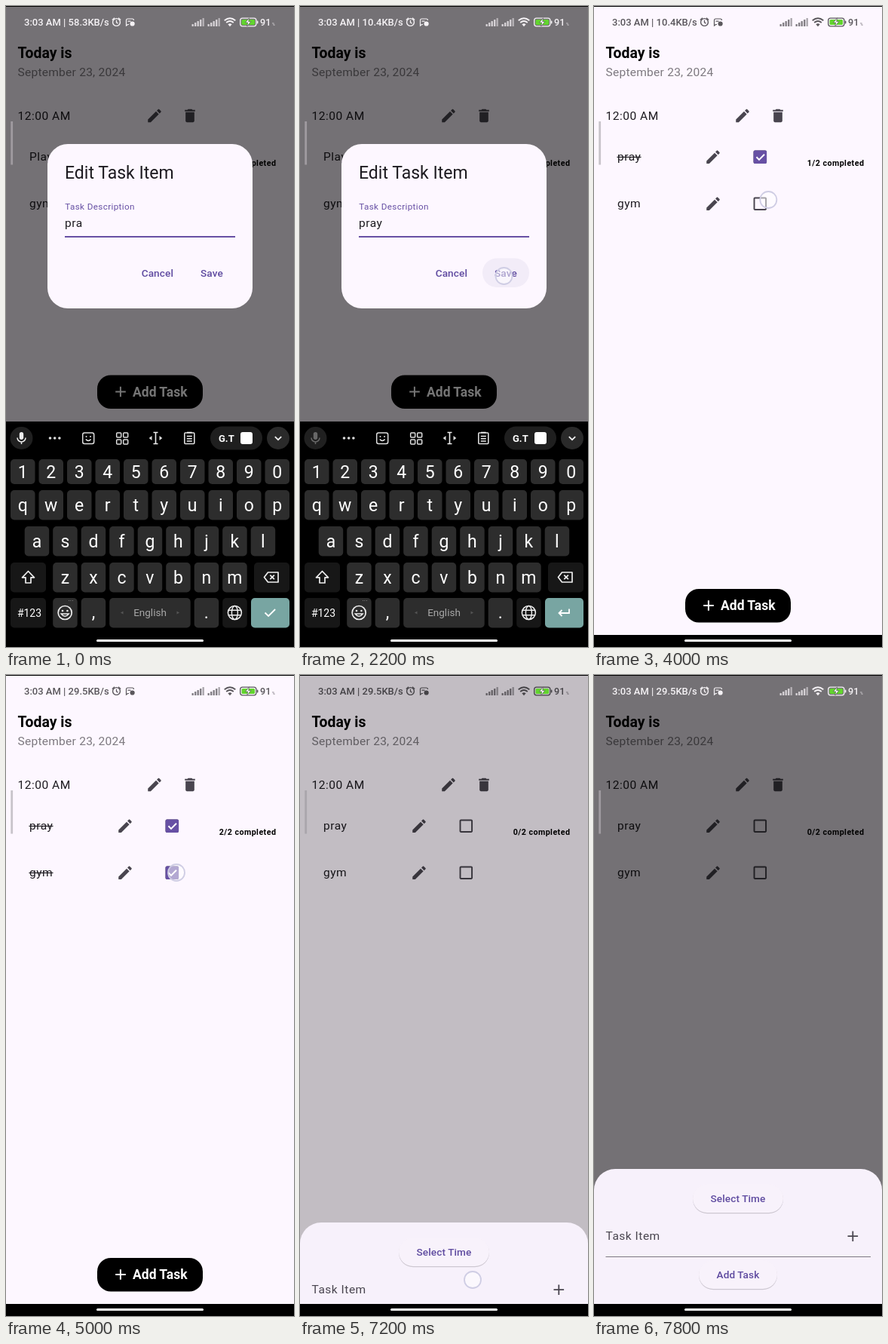
An HTML page for the animation above (8000 ms loop, 382x850 px).

```html
<!DOCTYPE html>
<html lang="en">
<head>
<meta charset="utf-8">
<title>Task planner</title>
<style>
html, body { margin: 0; width: 100%; height: 100%; overflow: hidden; background: #000; }
svg { display: block; width: 382px; height: 850px; font-family: Roboto, "Noto Sans", sans-serif; }
.body { font-size: 15.55px; letter-spacing: .49px; }
.btn { font-size: 13.6px; font-weight: 500; letter-spacing: .1px; fill: #5f4ba0; }
.mid { text-anchor: middle; }
.line { fill: none; stroke: currentColor; }
</style>
</head>
<body>
<svg id="stage" viewBox="0 0 382 850"></svg>
<script>
const PENCIL = 'M3 17.25V21h3.75L17.81 9.94l-3.75-3.75L3 17.25zM20.71 7.04c.39-.39.39-1.02 0-1.41l-2.34-2.34c-.39-.39-1.02-.39-1.41 0l-1.83 1.83 3.75 3.75 1.83-1.83z';
const TRASH = 'M6 19c0 1.1.9 2 2 2h8c1.1 0 2-.9 2-2V7H6v12zM19 4h-3.5l-1-1h-5l-1 1H5v2h14V4z';
const BOX = 'M19 5v14H5V5h14m0-2H5c-1.1 0-2 .9-2 2v14c0 1.1.9 2 2 2h14c1.1 0 2-.9 2-2V5c0-1.1-.9-2-2-2z';

const text = (x, y, s, attrs = '') => `<text x="${x}" y="${y}" ${attrs}>${s}</text>`;
const rect = (x, y, w, h, fill, r = 0, attrs = '') =>
  `<rect x="${x}" y="${y}" width="${w}" height="${h}" rx="${r}" fill="${fill}" ${attrs}/>`;
const line = (d, w = 1.5, attrs = '') => `<path class="line" d="${d}" stroke-width="${w}" ${attrs}/>`;
const icon = (d, cx, cy) =>
  `<path d="${d}" fill="#49454f" transform="translate(${cx} ${cy}) scale(.972) translate(-12 -12)"/>`;

const checkbox = (id, y) => icon(BOX, 220.3, y) +
  `<g id="${id}">${rect(211.6, y - 8.7, 17.5, 17.5, '#6750a4', 2)}
  ${line(`M215.5 ${y}l3.5 3.6 7-7.2`, 2, 'color="#fff"')}</g>`;

const bars = x => [3, 5, 7, 9, 11].map((h, i) =>
  rect(x + i * 3.5, 27 - h, 2.4, h, 'currentColor', .5, `opacity="${i < 4 ? .75 : .5}"`)).join('');

function statusBar() {
  return `<g id="status" fill="currentColor">
    <text id="clock" x="24" y="26" font-size="13" font-weight="500"></text>
    <circle class="line" cx="146.5" cy="21.5" r="4.9" stroke-width="1.4"/>
    ${line('M146.5 18.8v3l2 1.3M140.8 18.5l3.2-2.8M152.2 18.5l-3.2-2.8', 1.3)}
    ${line('M163 24.5h-1.5l-2 1.5v-7q0-2 2-2h6q2 0 2 2', 1.2)}
    <circle cx="167.6" cy="23.5" r="3.1"/>
    ${line('M161.5 20.2h4', 1.2)}
    ${bars(246.5)}${bars(267.5)}
    ${line('M289.7 19.2q7.3-6 14.6 0M292.2 22q4.8-4 9.6 0', 1.8)}
    <path d="M294.4 24.3q2.6-2 5.2 0l-2.6 3z"/>
    ${rect(310.7, 16.2, 21.2, 10.6, 'none', 3, 'stroke="currentColor" stroke-width="1.3"')}
    ${rect(312.5, 18, 17.6, 7, '#62d52e', 1.5)}
    ${rect(332.8, 19.6, 1.6, 4, 'currentColor', .8)}
    <path d="M322.5 15.8l-5 6.2h3.2l-1 5 5.2-6.4h-3.2z" fill="#fff" stroke="#555" stroke-width=".7"/>
    ${text(337, 26, '91', 'font-size="12.6" font-weight="500"')}
    ${text(353, 26, '%', 'font-size="5"')}
  </g>`;
}

function taskList() {
  return `${rect(0, 1, 382, 849, '#fdf7ff')}
    ${text(15.5, 69, 'Today is', 'font-size="19.4" font-weight="700"')}
    ${text(15.5, 93, 'September 23, 2024', 'font-size="15.55" letter-spacing=".24" fill="#7d797f"')}
    ${text(15.5, 150.5, '12:00 AM', 'class="body" fill="#1d1b20"')}
    ${icon(PENCIL, 197, 145.5)}${icon(TRASH, 244, 145.5)}
    ${text(31, 205.3, '', 'id="first" class="body" fill="#1d1b20"')}
    ${rect(30.5, 199.8, 32, 1.2, '#1d1b20', 0, 'id="strike1"')}
    ${text(31, 267.3, 'gym', 'class="body" fill="#1d1b20"')}
    ${rect(30.5, 261.8, 32, 1.2, '#1d1b20', 0, 'id="strike2"')}
    ${icon(PENCIL, 158, 200.3)}${icon(PENCIL, 158, 262.3)}
    ${checkbox('check1', 200.3)}${checkbox('check2', 262.3)}
    ${text(282.7, 212, '', 'id="count" font-size="10.7" font-weight="700" letter-spacing=".45"')}
    <g id="add">${rect(121, 773, 140, 44.5, '#000', 18)}
      ${line('M145.2 795h13.6M151.9 788.2v13.6', 2, 'color="#fff"')}
      ${text(168, 801.3, 'Add Task', 'font-size="17.5" font-weight="700" fill="#fff"')}</g>`;
}

function dialog() {
  return `<g id="dialog">${rect(55, 183, 272, 218, '#fdf7ff', 27)}
    ${text(78, 229, 'Edit Task Item', 'font-size="23" fill="#1d1b20"')}
    ${text(78.3, 270, 'Task Description', 'font-size="11.66" letter-spacing=".38" fill="#6750a4"')}
    ${text(78, 292.8, '', 'id="field" class="body" fill="#1d1b20"')}
    ${rect(78, 305, 226, 2, '#6750a4')}
    ${rect(242, 334.5, 62, 38.5, '#f2ecf8', 19.2, 'id="ripple"')}
    ${text(179.7, 359, 'Cancel', 'class="btn"')}
    ${text(258, 359, 'Save', 'class="btn"')}</g>`;
}

function pill(x, y, w, label) {
  return rect(x, y + .8, w, 38.5, '#cdc7d1', 19.2) + rect(x, y, w, 38, '#f8f2fb', 19) +
    text(x + w / 2, y + 24, label, 'class="btn mid"');
}

function sheet() {
  return `<g id="sheet"><path d="M0 860V683a28 28 0 0 1 28-28h326a28 28 0 0 1 28 28V860z" fill="#f7f1fb"/>
    ${pill(131, 675, 120, 'Select Time')}
    ${text(15.5, 749.3, 'Task Item', 'class="body" fill="#49454f"')}
    ${line('M336.5 744.2h13.6M343.3 737.4v13.6', 1.8, 'color="#49454f"')}
    ${rect(15.5, 771, 351.5, 1, '#7d7880')}
    ${pill(139, 776, 104, 'Add Task')}</g>`;
}

function keyRow(chars, x, y, h, baseline) {
  return [...chars].map((c, i) => {
    const left = x + i * 37.5;
    return rect(left, y, 32.5, h, '#2d2d2d', 5) +
      text(left + 16.2, baseline, c, 'class="mid" font-size="23" fill="#fff"');
  }).join('');
}

function keyboard() {
  const dark = '#171717', grey = '#2d2d2d';
  const dots = [58.5, 64.7, 70.9].map(x => `<circle cx="${x}" cy="573" r="1.8" fill="#ddd"/>`).join('');
  const grid = [146.7, 155.7].map(x => [566, 575].map(y =>
    rect(x, y, 6, 6, 'none', 1, 'stroke="#ddd" stroke-width="1.5"')).join('')).join('');
  return `<g id="keyboard" color="#eee">${rect(0, 551, 382, 320, '#000')}
    <circle cx="20.5" cy="573" r="15" fill="#202020"/>
    <g id="mic">${rect(17.8, 565, 5.4, 10, 'currentColor', 2.7)}
      ${line('M15 572.5a5.5 5.5 0 0 0 11 0M20.5 578v3', 1.5)}</g>
    ${dots}
    ${rect(101.7, 566, 15, 14.5, 'none', 2.5, 'stroke="#ddd" stroke-width="1.5"')}
    <circle cx="106.5" cy="571" r="1" fill="#ddd"/><circle cx="112" cy="571" r="1" fill="#ddd"/>
    ${line('M105.8 574.5q3.4 4 6.8 0', 1.4)}
    ${grid}
    ${line('M195.5 565.5h6M195.5 580.5h6M198.5 565.5v15', 1.6)}
    <path d="M193.5 570v6l-3.8-3zM203.5 570v6l3.8-3z" fill="#ddd"/>
    ${rect(236.8, 566, 13, 14.5, 'none', 1, 'stroke="#ddd" stroke-width="1.6"')}
    ${line('M240 565.5h6.6M239.8 570.5h7M239.8 573.7h7M239.8 577h7', 1.5)}
    ${rect(271, 557.5, 69, 31, '#1f1f1f', 15.5)}
    ${text(282, 577.5, 'G.T', 'font-size="13" font-weight="700" fill="#fff"')}
    ${rect(311, 565, 16, 16, '#fff', 3)}
    <circle cx="361" cy="573" r="15" fill="#2a2a2a"/>
    ${line('M356.8 571.2l4.2 4 4.2-4', 1.8)}
    ${keyRow('1234567890', 6, 601, 33, 626)}
    ${keyRow('qwertyuiop', 6, 642, 39.5, 669.5)}
    ${keyRow('asdfghjkl', 24.7, 690, 39.5, 717.5)}
    ${rect(6, 738, 47, 39.5, dark, 5)}
    ${line('M29.5 749.5l-8 8.3h4.5v7.2h7v-7.2h4.5z', 1.7, 'stroke-linejoin="round"')}
    ${keyRow('zxcvbnm', 62.2, 738, 39.5, 765.5)}
    ${rect(329, 738, 47, 39.5, dark, 5)}
    ${line('M342.5 757.5l5-6.5h13.5v13h-13.5zM350.3 754.6l5.6 5.6M355.9 754.6l-5.6 5.6', 1.7, 'stroke-linejoin="round"')}
    ${rect(6, 785, 47, 39.5, dark, 5)}
    ${text(31, 810, '#123', 'class="mid" font-size="14" fill="#fff"')}
    ${rect(62.2, 785, 32.5, 39.5, grey, 5)}
    <circle class="line" cx="78.2" cy="804.5" r="9" stroke-width="1.7"/>
    <circle cx="75" cy="802" r="1.3" fill="#eee"/><circle cx="81.4" cy="802" r="1.3" fill="#eee"/>
    ${line('M73.2 806q5 6.5 10 0z', 1.5)}
    ${text(86, 789, '...', 'class="mid" font-size="9" fill="#999"')}
    ${keyRow(',', 99.7, 785, 39.5, 812)}
    ${rect(137.2, 785, 107.5, 39.5, grey, 5)}
    ${text(191, 809, 'English', 'class="mid" font-size="13.5" fill="#a8a8a8"')}
    <path d="M155.5 802.5v4l-3.5-2zM226.5 802.5v4l3.5-2z" fill="#555"/>
    ${keyRow('.', 249.7, 785, 39.5, 812)}
    ${rect(287.2, 785, 32.5, 39.5, dark, 5)}
    <circle class="line" cx="303.4" cy="804.5" r="9" stroke-width="1.5"/>
    <ellipse class="line" cx="303.4" cy="804.5" rx="4" ry="9" stroke-width="1.4"/>
    ${line('M295.2 801.3h16.4M295.2 807.7h16.4', 1.4)}
    ${rect(325, 785, 51, 39.5, '#78a5a2', 5)}
    ${line('M343.5 804.5l4.6 4.5 9-9', 1.8, 'id="done" color="#fff"')}
    ${line('M357 799.5v5.5h-13.5M347.5 801l-4 4 4 4', 1.8, 'id="enter" color="#fff"')}
  </g>`;
}

const stage = document.getElementById('stage');
stage.innerHTML = taskList() +
  rect(0, 1, 382, 849, '#000', 0, 'id="scrim"') +
  rect(6.3, 153, 2.8, 57.5, '#c8c3ca', 0, 'id="thumb"') +
  statusBar() + dialog() + sheet() + keyboard() +
  rect(0, 834, 382, 16, '#000', 0, 'id="nav"') + rect(120, 840, 142, 3, '#fff', 1.5) +
  rect(0, 0, 382, 1, '#000') +
  '<circle id="touch" r="11" fill="#fff" fill-opacity=".5" stroke="#cfcde4" stroke-width="1.8"/>';

const el = {};
stage.querySelectorAll('[id]').forEach(n => el[n.id] = n);
const show = (name, on) => el[name].setAttribute('visibility', on ? 'visible' : 'hidden');
const set = (name, attr, value) => el[name].setAttribute(attr, value);

const LOOP = 8000, STEP = 200;
const SAVED = 2400, SHEET = 7200;
const toggles = [3200, 4200, 5200, 5800];
const touches = [
  [2200, 270.5, 358], [3000, 223, 201], [4000, 231.3, 257],
  [5000, 226, 262], [5600, 226, 200], [SHEET, 229, 802]
];

function render(ms) {
  const t = Math.floor(ms % LOOP / STEP) * STEP;
  const editing = t < SAVED, rising = t === SHEET, adding = t >= SHEET;
  const speed = t < 800 ? '58.3' : t < 4600 ? '10.4' : '29.5';
  el.clock.textContent = `3:03 AM | ${speed}KB/s`;

  const first = t >= toggles[0] && t < toggles[3];
  const second = t >= toggles[1] && t < toggles[2];
  el.first.textContent = editing ? 'Play' : 'pray';
  el.count.textContent = `${first + second}/2 completed`;
  ['check1', 'strike1'].forEach(n => show(n, first));
  ['check2', 'strike2'].forEach(n => show(n, second));

  // the thumb fades back in whenever the list is rebuilt
  const rebuilt = t === SAVED || toggles.includes(t);
  const dark = editing || (adding && !rising);
  set('thumb', 'opacity', rebuilt ? .2 : 1);
  set('thumb', 'fill', dark ? '#a09ba0' : rising ? '#aaa6ac' : '#c8c3ca');
  set('status', 'color', dark ? '#f5f2f5' : rising ? '#454347' : t === SAVED ? '#858087' : '#5a575c');
  set('scrim', 'opacity', rising ? .235 : dark ? .54 : 0);

  show('dialog', editing);
  el.field.textContent = t < 600 ? 'pra' : 'pray';
  show('ripple', t === 2200);
  show('keyboard', t <= SAVED);
  set('keyboard', 'transform', `translate(0 ${t === SAVED ? 271 : 0})`);
  set('mic', 'opacity', t < 1400 ? 1 : .35);
  show('done', t < 600);
  show('enter', t >= 600 && editing);
  set('add', 'transform', `translate(0 ${editing ? -283.5 : t === SAVED ? -1 : 0})`);
  show('nav', !editing);

  show('sheet', adding);
  set('sheet', 'transform', `translate(0 ${rising ? 71 : 0})`);

  const touch = touches.find(p => p[0] === t);
  show('touch', touch);
  if (touch) set('touch', 'transform', `translate(${touch[1]} ${touch[2]})`);
}

const start = performance.now();
function tick() {
  render(performance.now() - start);
  requestAnimationFrame(tick);
}
tick();
</script>
</body>
</html>
```
